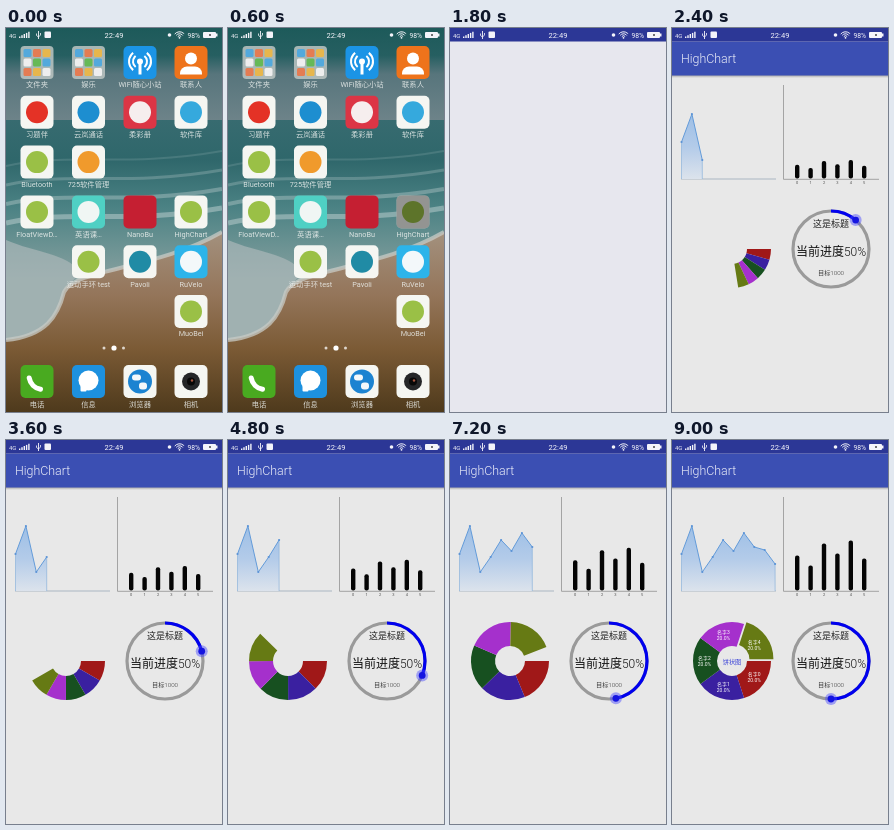
Write an HTML page with a canvas that moves like this. It is 216 by 384 pixels and loops after 9600 ms.

```html
<!DOCTYPE html>
<html lang="zh">
<head>
<meta charset="utf-8">
<style>
html, body { margin: 0; width: 100%; height: 100%; overflow: hidden; background: #e8e8e8; }
canvas { display: block; width: 216px; height: 384px; }
</style>
</head>
<body>
<canvas id="stage"></canvas>
<script>
const W = 216, H = 384, STEP = 600, STEPS = 16, TAU = Math.PI * 2;
const canvas = document.getElementById('stage');
const ratio = window.devicePixelRatio || 1;
canvas.width = W * ratio;
canvas.height = H * ratio;
const c = canvas.getContext('2d');
const FONT = 'Roboto, "Noto Sans CJK SC", "Noto Sans CJK", sans-serif';

function rect(x, y, w, h, color, r = 0) {
  c.fillStyle = color;
  c.beginPath();
  c.roundRect(x, y, w, h, r);
  c.fill();
}
function disc(x, y, r, color) {
  c.fillStyle = color;
  c.beginPath();
  c.arc(x, y, r, 0, TAU);
  c.fill();
}
function arc(x, y, r, from, to, color, width) {
  c.strokeStyle = color;
  c.lineWidth = width;
  c.beginPath();
  c.arc(x, y, r, from, to);
  c.stroke();
}
function line(points, color, width = 1) {
  c.strokeStyle = color;
  c.lineWidth = width;
  c.beginPath();
  points.forEach(([x, y]) => c.lineTo(x, y));
  c.stroke();
}
function text(s, x, y, size, color, align = 'center', weight = 400) {
  c.font = `${weight} ${size}px ${FONT}`;
  c.fillStyle = color;
  c.textAlign = align;
  c.textBaseline = 'alphabetic';
  c.fillText(s, x, y);
}
function fade(y0, y1, ...stops) {
  const g = c.createLinearGradient(0, y0, 0, y1);
  stops.forEach(([at, color]) => g.addColorStop(at, color));
  return g;
}

function statusBar() {
  const white = '#f4f4fa';
  text('4G', 3, 10, 6, white, 'left');
  for (let i = 0; i < 5; i++) rect(13 + i * 2.3, 8.5 - i * 1.2, 1.4, 1.5 + i * 1.2, white);
  line([[32.5, 3], [32.5, 11]], white, 0.9);
  line([[30.5, 5.5], [30.5, 7.5], [32.5, 9], [34.5, 7], [34.5, 5]], white, 0.8);
  rect(38.5, 3.5, 6.5, 6.5, white, 1);
  text('22:49', 108, 10, 7.6, white);
  disc(163.5, 7, 1.8, white);
  for (const r of [2.2, 4.2, 6.2]) arc(173.5, 10, r, -Math.PI * .78, -Math.PI * .22, white, 1);
  disc(173.5, 9.8, 0.9, white);
  text('98%', 194, 9.6, 6.8, white, 'right');
  rect(197, 4, 13, 6, white, 1);
  rect(210, 5.5, 1.5, 3, white);
  disc(204, 7, 1, '#444');
}

// ---- Home screen ----

function wallpaper() {
  rect(0, 0, W, 92, fade(0, 92, [0, '#1d5a5a'], [.3, '#265f61'], [.5, '#57757c'], [1, '#6d8389']));
  rect(0, 92, W, H - 92, fade(92, 250, [0, '#376b70'], [.25, '#2f676b'], [.55, '#4b8284'], [1, '#86a09f']));

  // breaking waves
  for (let i = 0; i < 4; i++) {
    const y = 128 + i * 19;
    c.strokeStyle = `rgba(205,218,218,${.15 + i * .1})`;
    c.lineWidth = 2 + i;
    c.beginPath();
    c.moveTo(0, y + 10);
    c.bezierCurveTo(60, y - 4, 120, y + 12, W, y - 5);
    c.stroke();
  }

  // beach with foam along its edge
  const shore = new Path2D('M0 312 C40 308 52 288 58 264 C70 240 150 242 216 204');
  const sand = new Path2D(shore);
  sand.lineTo(W, H);
  sand.lineTo(0, H);
  const foam = new Path2D('M0 212 C30 225 60 225 74 244 L58 264 C52 288 40 308 0 312');
  c.fillStyle = 'rgba(172,184,186,.7)';
  c.fill(foam);
  c.fillStyle = fade(204, H, [0, '#a3917e'], [.35, '#94755a'], [.65, '#7b5a35'], [1, '#4e3a1c']);
  c.fill(sand);
  c.strokeStyle = 'rgba(200,203,198,.75)';
  c.lineWidth = 4;
  c.stroke(shore);
}

const GREEN = '#9ac046', TILE = '#f5f6f2', LABEL = 'rgba(240,243,241,.85)';

function marked(color, mark) {
  return (x, y) => {
    rect(x - 16.5, y - 16.5, 33, 33, color, 5);
    if (mark) disc(x, y, 11, mark);
  };
}
const droid = marked(TILE, GREEN);

function folder(x, y) {
  const hues = ['#53a9dc', '#e7b64d', '#66b957', '#e47c53', '#eee'];
  rect(x - 16.5, y - 16.5, 33, 33, 'rgba(190,198,196,.85)', 4);
  for (let i = 0; i < 9; i++)
    rect(x - 13.5 + i % 3 * 9.5, y - 13.5 + Math.floor(i / 3) * 9.5, 8, 8, hues[i * 3 % 5], 1.5);
}
function hotspot(x, y) {
  marked('#1b94e6')(x, y);
  disc(x, y - 1, 3, '#fff');
  rect(x - 1.5, y, 3, 12, '#fff');
  for (const r of [7, 11])
    for (const a of [0, Math.PI]) arc(x, y - 1, r, a - .9, a + .9, '#fff', 2);
}
function person(x, y) {
  marked('#ee731b')(x, y);
  disc(x, y - 4, 6, '#fff');
  rect(x - 11, y + 4, 22, 8, '#fff', [7, 7, 0, 0]);
}
function phone(x, y) {
  marked('#49aa20')(x, y);
  c.lineCap = 'round';
  arc(x + 6, y - 6, 14, 1.75, 2.96, '#fff', 5);
  c.lineCap = 'butt';
}
function message(x, y) {
  marked('#1d91df')(x, y);
  disc(x, y - 1, 10, '#fff');
  rect(x - 8, y + 4, 6, 6, '#fff', 1);
}
function globe(x, y) {
  marked(TILE)(x, y);
  disc(x, y, 12, '#1c83d1');
  rect(x - 8, y - 7, 9, 6, '#f4f8fa', 3);
  rect(x - 1, y + 1, 8, 7, '#f4f8fa', 3);
}
function camera(x, y) {
  marked(TILE)(x, y);
  disc(x, y, 9, '#252628');
  disc(x, y, 4, '#080808');
  disc(x + 1, y - 1, 1.2, '#a8553e');
}

const COLS = [31, 82.5, 134, 185];
const APPS = [
  [0, 0, '文件夹', folder],
  [1, 0, '娱乐', folder],
  [2, 0, 'WiFi随心小站', hotspot],
  [3, 0, '联系人', person],
  [0, 1, '习题伴', marked(TILE, '#e43226')],
  [1, 1, '云岚通话', marked(TILE, '#1d8ed0')],
  [2, 1, '柔彩册', marked('#dc3545', '#f6eeee')],
  [3, 1, '软件库', marked(TILE, '#35a9dd')],
  [0, 2, 'Bluetooth', droid],
  [1, 2, '725软件管理', marked(TILE, '#f09a2c')],
  [0, 3, 'FloatViewD…', droid],
  [1, 3, '英语课…', marked('#4fd0c4', '#f0f6f4')],
  [2, 3, 'NanoBu', marked('#c51f32')],
  [3, 3, 'HighChart', droid],
  [1, 4, '运动手环 test', droid],
  [2, 4, 'Pavoli', marked(TILE, '#208ba5')],
  [3, 4, 'RuVelo', marked('#2cb4ea', '#f3f8fa')],
  [3, 5, 'MuoBei', droid]
];
const DOCK = [['电话', phone], ['信息', message], ['浏览器', globe], ['相机', camera]];

function home(step) {
  wallpaper();
  statusBar();
  for (const [col, row, name, icon] of APPS) {
    const x = COLS[col], y = 34.5 + row * 49.8;
    icon(x, y);
    if (step > 0 && name === 'HighChart') rect(x - 16.5, y - 16.5, 33, 33, 'rgba(0,0,0,.4)', 5);
    text(name, x, y + 24.8, 7.3, LABEL);
  }
  DOCK.forEach(([name, icon], i) => {
    icon(COLS[i], 353.5);
    text(name, COLS[i], 378.8, 7.3, LABEL);
  });
  disc(98, 320, 1.5, 'rgba(255,255,255,.75)');
  disc(108, 320, 2.6, '#fff');
  disc(117.5, 320, 1.5, 'rgba(255,255,255,.75)');
  if (step > 1) {
    rect(26, 47, 164, 10, 'rgba(40,55,145,.55)');
    rect(26, 57, 164, 280, 'rgba(231,231,238,.42)');
  }
}

// ---- Chart screen ----

const TREND = [114, 86, 132, 117, 100, 111, 93, 107, 110, 124];
const BARS = [35, 25, 47, 37, 50, 32];
const SLICES = ['#a01818', '#3a20a0', '#175020', '#a530cc', '#667a14'];

function lineChart(last) {
  const pts = TREND.slice(0, last + 1).map((y, i) => [9.5 + i * 10.4, y]);
  const end = pts[last][0];
  line([[9, 151], [104, 151]], '#9aa9b8', .8);
  c.fillStyle = fade(86, 151, [0, '#9dbfe6'], [.5, '#b3cbe9'], [1, '#dce3ec']);
  c.beginPath();
  [...pts, [end, 151], [9.5, 151]].forEach(([x, y]) => c.lineTo(x, y));
  c.fill();
  line([[9.5, 151], pts[0]], '#8db4dc', .7);
  line([pts[last], [end, 151]], '#8db4dc', .7);
  line(pts, '#639bd9', 1);
  pts.forEach(([x, y]) => disc(x, y, 1.1, '#5b93d6'));
}

function barChart(p) {
  line([[111.5, 57], [111.5, 151.3], [207, 151.3]], '#929292', .8);
  BARS.forEach((h, i) => {
    const x = 125.2 + i * 13.4, now = 4 + (h - 4) * p;
    rect(x - 2.2, 150.5 - now, 4.4, now, '#050505', 2);
    text(i, x, 155.5, 4, '#555');
  });
}

function pieChart(turn, done) {
  const cx = 60, cy = 221, size = turn * TAU / 5;
  SLICES.forEach((color, i) => {
    const a = i * size, mid = a + size / 2, out = done && i === 4 ? 3 : 0;
    const x = cx + Math.cos(mid) * out, y = cy + Math.sin(mid) * out;
    c.fillStyle = color;
    c.beginPath();
    c.arc(x, y, 39, a, a + size);
    c.arc(x, y, 15, a + size, a, true);
    c.fill();
    if (!done) return;
    const tx = cx + Math.cos(mid) * 27.5, ty = cy + Math.sin(mid) * 27.5;
    text('名字' + i, tx, ty - 1, 5, '#fff');
    text('20.0%', tx, ty + 5, 5, '#fff');
  });
  if (done) text('饼状图', cx, cy + 2.5, 6.2, '#3d45d8');
}

function ring(turn) {
  const x = 159, y = 221, r = 38, top = -Math.PI / 2, end = top + turn * Math.PI;
  arc(x, y, r, 0, TAU, '#9a9a9a', 3.2);
  arc(x, y, r, top, end, '#0000ee', 3.2);
  const dx = x + Math.cos(end) * r, dy = y + Math.sin(end) * r;
  disc(dx, dy, 6, 'rgba(70,70,255,.45)');
  disc(dx, dy, 3.4, '#1414e0');
  text('这是标题', x, 199.3, 9, '#222', 'center', 300);
  text('当前进度50%', x, 227.5, 12, '#111', 'center', 300);
  text('目标1000', x, 247, 6.2, '#333', 'center', 300);
}

function charts(step) {
  const p = Math.min(1, (step + .74) / 15.08);
  const eased = (1 - Math.cos(Math.PI * p)) / 2;
  rect(0, 0, W, H, '#e8e8e8');
  rect(0, 47, W, 3, fade(47, 50, [0, 'rgba(0,0,0,.3)'], [1, 'rgba(0,0,0,0)']));
  rect(0, 13.5, W, 34, '#3b4fb3');
  rect(0, 0, W, 13.5, '#2c3796');
  statusBar();
  text('HighChart', 9, 35.3, 12.4, '#eceef9', 'left', 300);
  lineChart(Math.floor(step * .6 + 1e-6));
  barChart(p);
  pieChart(eased, p === 1);
  ring(eased);
}

function blank() {
  rect(0, 0, W, H, '#e7e7ee');
  rect(0, 0, W, 13.5, '#2c3796');
  statusBar();
}

const start = performance.now();
function draw() {
  const step = Math.floor(Math.max(0, performance.now() - start) / STEP) % STEPS;
  c.setTransform(ratio, 0, 0, ratio, 0, 0);
  if (step < 3) home(step);
  else if (step === 3) blank();
  else charts(step);
  requestAnimationFrame(draw);
}
draw();
</script>
</body>
</html>
```
